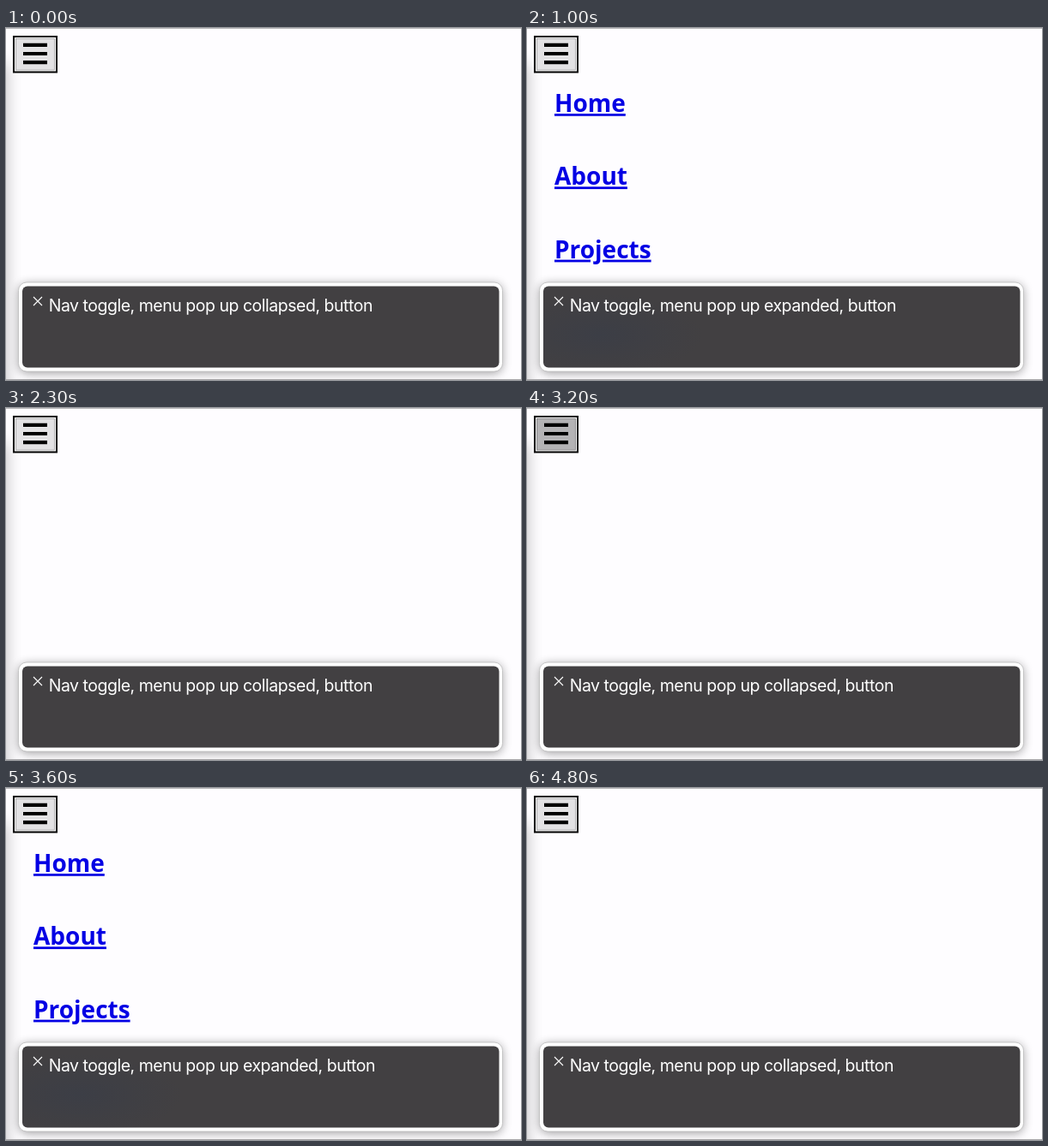
An HTML page for the animation above (5800 ms loop, 600 by 411 pixels).

```html
<!DOCTYPE html>
<html lang="en">
<head>
<meta charset="utf-8">
<title>Menu toggle with screen reader caption</title>
<style>
  html, body { margin: 0; width: 100%; height: 100%; overflow: hidden; background: #fefdff; }
  svg { display: block; width: 100vw; height: 100vh; }
  #menu text {
    font: 700 28px "Noto Sans", "Open Sans", sans-serif;
    text-decoration: underline;
    text-decoration-thickness: 2px;
  }
  #caption { font: 400 19.5px Inter, Roboto, sans-serif; letter-spacing: -0.48px; fill: #fff; }
</style>
</head>
<body>
<svg viewBox="0 0 600 411">
  <defs>
    <filter id="edgeBlur" x="-60" y="-40" width="140" height="560" filterUnits="userSpaceOnUse">
      <feGaussianBlur stdDeviation="9"/>
    </filter>
    <filter id="panelBlur" x="-20" y="260" width="640" height="180" filterUnits="userSpaceOnUse">
      <feGaussianBlur stdDeviation="6"/>
    </filter>
    <radialGradient id="tintFill">
      <stop offset="0" stop-color="#3c3e46"/>
      <stop offset="1" stop-color="#3c3e46" stop-opacity="0"/>
    </radialGradient>
    <clipPath id="panelClip"><rect x="19" y="301.5" width="555.5" height="95" rx="6"/></clipPath>
  </defs>

  <rect width="600" height="411" fill="#fefdff"/>
  <rect x="-40" y="42" width="41" height="420" fill="#000" opacity=".24" filter="url(#edgeBlur)"/>
  <rect width="600" height="1" fill="#b9b8ba"/>
  <rect y="410" width="600" height="1" fill="#a9a8aa"/>

  <g id="menu">
    <text x="32" y="98">Home</text>
    <text x="32" y="183.3">About</text>
    <text x="32" y="268.6">Projects</text>
  </g>

  <rect x="9" y="10" width="50" height="41.5" fill="#fff" stroke="#000" stroke-width="2"/>
  <rect id="face" x="11.5" y="12.5" width="45" height="36.5"/>
  <path d="M20 20H48M20 30.2H48M20 40.3H48" transform="translate(0 -.2)" stroke="#000" stroke-width="4.2"/>

  <rect x="15" y="299" width="563" height="104" rx="9" fill="#000" opacity=".38" filter="url(#panelBlur)"/>
  <rect x="14.5" y="297" width="564" height="104" rx="9.5" fill="#fff" stroke="#bbb" stroke-width=".8"/>
  <rect x="19" y="301.5" width="555.5" height="95" rx="6" fill="#424042"/>
  <g clip-path="url(#panelClip)">
    <ellipse id="tint" cx="85" cy="358" rx="120" ry="48" fill="url(#tintFill)"/>
  </g>
  <path d="M32 314L42 324M42 314L32 324" stroke="#fff" stroke-width="1.1"/>
  <text id="caption" x="49.7" y="330.5"></text>
</svg>
<script>
  const LOOP = 5800;
  const FADE = 100;
  const cycles = [
    { press: 500, open: 700, expanded: 900, pressAgain: 2000, close: 2100, collapsed: 2300 },
    { press: 3200, open: 3400, expanded: 3600, pressAgain: 4500, close: 4600, collapsed: 4800 }
  ];
  const el = id => document.getElementById(id);
  const [menu, face, tint, caption] = ["menu", "face", "tint", "caption"].map(el);
  const within = (t, start, end) => t >= start && t < end;

  function render(t) {
    const active = cycles.find(c => within(t, c.open, c.close));
    const pressed = cycles.some(c => within(t, c.press, c.open) || within(t, c.pressAgain, c.close));
    const expanded = cycles.some(c => within(t, c.expanded, c.collapsed));

    menu.style.display = tint.style.display = active ? "" : "none";
    if (active) {
      // The links settle from a paler blue just after opening.
      const pale = Math.max(0, 1 - (t - active.open) / FADE);
      menu.setAttribute("fill", `rgb(${4 + 34 * pale},${34 * pale},${228 + 2 * pale})`);
    }
    face.setAttribute("fill", pressed ? "#b4b3b5" : "#e3e2e4");
    face.setAttribute("stroke", pressed ? "#8c8b8d" : "#b0afb1");
    const label = `Nav toggle, menu pop up ${expanded ? "expanded" : "collapsed"}, button`;
    if (caption.textContent !== label) caption.textContent = label;
  }

  const start = performance.now();
  function tick() {
    render((performance.now() - start) % LOOP);
    requestAnimationFrame(tick);
  }
  tick();
</script>
</body>
</html>
```
